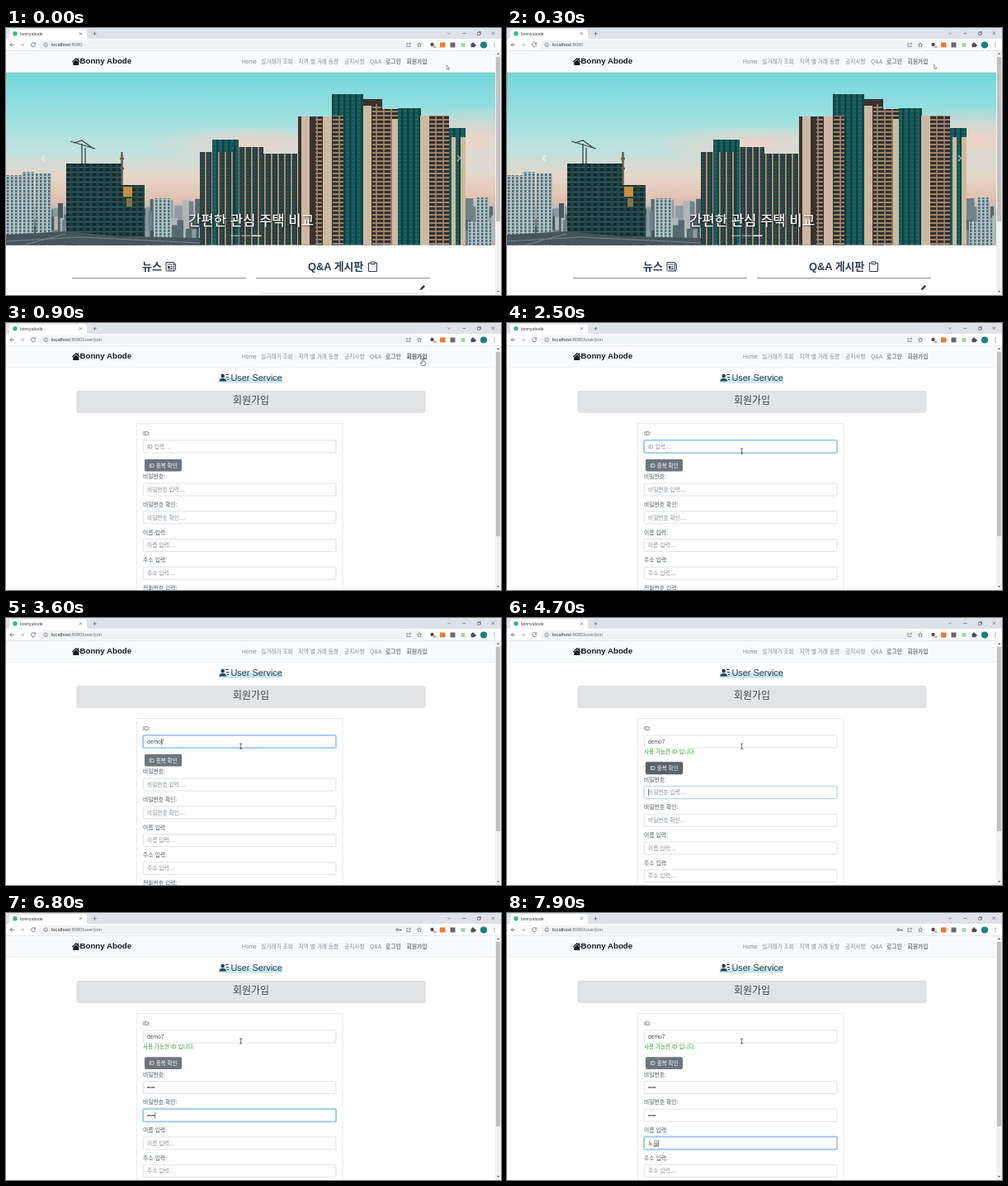
An HTML page for the animation above (8 s loop, 600x323 px).

```html
<!DOCTYPE html>
<html lang="ko">
<head>
<meta charset="utf-8">
<style>
html, body { margin: 0; width: 100%; height: 100%; overflow: hidden; background: #fff; }
svg { display: block; width: 100vw; height: 100vh; font-family: "Liberation Sans", "Noto Sans CJK KR", sans-serif; }
text { white-space: pre; }
</style>
</head>
<body>
<svg id="stage" viewBox="0 0 600 323" xmlns="http://www.w3.org/2000/svg">
  <defs>
    <linearGradient id="sky" x1="0" y1="0" x2="0" y2="1">
      <stop offset="0" stop-color="#72d6da"/><stop offset=".25" stop-color="#9be0e1"/>
      <stop offset=".45" stop-color="#bfe2df"/><stop offset=".6" stop-color="#e6d6c8"/>
      <stop offset=".72" stop-color="#e3c3b1"/><stop offset=".85" stop-color="#b3b0b0"/>
    </linearGradient>
    <radialGradient id="cloud"><stop offset="0" stop-color="#f3d3c5" stop-opacity=".95"/><stop offset="1" stop-color="#f3d3c5" stop-opacity="0"/></radialGradient>
    <pattern id="glass" width="7" height="5" patternUnits="userSpaceOnUse">
      <rect width="7" height="5" fill="#155a5a"/><path d="M0 .5H7" stroke="#2d7773" stroke-width=".6"/>
      <rect x="3" width="2.500" height="5" fill="#0d4144"/>
    </pattern>
    <pattern id="stripes" width="8" height="4" patternUnits="userSpaceOnUse">
      <rect width="8" height="4" fill="#2f3a3a"/><rect x="1" width="1.800" height="4" fill="#a89780"/>
      <rect x="4" y="1" width="3" height="2" fill="#1c5553"/>
    </pattern>
    <pattern id="balcony" width="9" height="5" patternUnits="userSpaceOnUse">
      <rect width="9" height="5" fill="#8c7560"/><rect y="2" width="7" height="3" fill="#352f2c"/>
      <path d="M0 1H9" stroke="#b39d82" stroke-width=".7"/>
    </pattern>
    <pattern id="flats" width="5" height="4" patternUnits="userSpaceOnUse">
      <rect width="5" height="4" fill="#b3c3c5"/><rect x="1" width="2.500" height="3" fill="#4f6f78"/>
    </pattern>
    <pattern id="frame" width="8" height="6" patternUnits="userSpaceOnUse">
      <rect width="8" height="6" fill="#1d4245"/><path d="M0 .5H8" stroke="#3f615f" stroke-width=".7"/>
      <rect x="1" y="2" width="4" height="3" fill="#11292d"/>
    </pattern>
    <filter id="soft" x="-10%" y="-30%" width="120%" height="180%">
      <feDropShadow dx=".8" dy=".8" stdDeviation=".9" flood-color="#000" flood-opacity=".9"/>
    </filter>
    <clipPath id="photoClip"><rect y="53.5" width="593" height="209"/></clipPath>
  </defs>
  <rect width="600" height="323" fill="#fff"/>
  <g id="home"></g>
  <g id="join"></g>
  <g id="nav"></g>
  <g id="chrome"></g>
  <g id="pointer"></g>
</svg>
<script>
const LOOP = 8000;
const $ = id => document.getElementById(id);
const rect = (x, y, w, h, fill, more = "") =>
  `<rect x="${x}" y="${y}" width="${w}" height="${h}" fill="${fill}" ${more}/>`;
const line = (d, stroke, width = 0.8, more = "") =>
  `<path d="${d}" fill="none" stroke="${stroke}" stroke-width="${width}" ${more}/>`;
const shape = (d, fill, more = "") => `<path d="${d}" fill="${fill}" ${more}/>`;
const circle = (x, y, r, fill) => `<circle cx="${x}" cy="${y}" r="${r}" fill="${fill}"/>`;
const ellipse = (x, y, rx, ry, fill) => `<ellipse cx="${x}" cy="${y}" rx="${rx}" ry="${ry}" fill="${fill}"/>`;
const text = (x, y, size, fill, str, more = "") =>
  `<text x="${x}" y="${y}" font-size="${size}" fill="${fill}" ${more}>${str}</text>`;
const clamp = v => Math.max(0, Math.min(1, v));
const ease = v => (v = clamp(v), v * v * (3 - 2 * v));
const BOLD = 'font-weight="700"';
const MIDDLE = 'text-anchor="middle"';

function skyline(from, to) {
  const tones = ["#8d9ca2", "#6f8288", "#b2b7b6", "#566a70", "#47595f"];
  let seed = 7, out = "";
  const random = () => (seed = (seed * 16807) % 2147483647) / 2147483647;
  for (let row = 0; row < 3; row++) {
    for (let x = from; x < to; x += 4 + random() * 6) {
      const y = 206 + row * 13 + random() * 14;
      out += rect(x, y, 4 + random() * 7, 263 - y, tones[Math.floor(random() * tones.length)]);
    }
  }
  return out;
}

function photo() {
  const cream = "#cdb9a0", shade = "#3a3330";
  // Each tower: left, top, right, fill; all reach the lower edge.
  const towers = [
    [0, 178, 19, "flats"], [19, 174, 34, "flats"], [36, 176, 55, "flats"],
    [179, 206, 200, "flats"], [560, 234, 588, "flats"], [570, 205, 585, "flats"],
    [73, 164, 140, "frame"], [140, 190, 168, "frame"],
    [235, 150, 251, "stripes"], [250, 135, 282, "glass"], [256, 150, 276, "stripes"],
    [282, 144, 312, "stripes"], [312, 152, 353, "stripes"],
    [354, 107, 396, shade], [358, 107, 368, cream], [384, 107, 395, cream],
    [395, 80, 433, "glass"], [396, 106, 409, "balcony"], [433, 86, 456, shade],
    [433, 94, 443, cream], [444, 92, 455, "balcony"], [455, 98, 476, "balcony"],
    [468, 110, 475, cream], [475, 97, 503, "glass"], [502, 106, 514, cream],
    [513, 106, 537, "balcony"], [537, 121, 557, "glass"], [540, 132, 545, cream], [551, 132, 557, cream],
  ];
  let out = rect(0, 53, 593, 210, "url(#sky)")
    + ellipse(570, 135, 120, 42, "url(#cloud)") + ellipse(300, 140, 130, 24, "url(#cloud)")
    + skyline(0, 240) + skyline(556, 593);
  out += towers.map(([x, y, right, fill]) =>
    rect(x, y, right - x, 263 - y, fill[0] === "#" ? fill : `url(#${fill})`)).join("");
  out += rect(375, 107, 8, 156, "url(#balcony)");
  out += rect(142, 192, 11, 12, "#c98f3c") + rect(146, 206, 7, 10, "#8a7440");
  out += line("M78 137L108 146M92 140V164M82 139L92 136L106 146M96 145V164", "#38464a", 1.3);
  out += line("M140.500 150V190M138 158H143M138 170H143", "#665950", 2.5);
  out += shape("M0 250L72 246L140 252L235 254V263H0Z", "#45555b");
  out += line("M0 258L90 253L235 260M20 263L72 249", "#77868a", 1);
  return `<g clip-path="url(#photoClip)">${out}</g>`;
}

function drawHome() {
  const ink = "#2c3e50";
  $("home").innerHTML = photo()
    + line("M47 154L43.500 157.500L47 161M547 154L550.500 157.500L547 161", "#fff", 1.3, 'opacity=".6"')
    + text(297, 238.5, 16.7, "#fff", "간편한 관심 주택 비교", MIDDLE + ' filter="url(#soft)"')
    + rect(272, 250.7, 11.5, 1.3, "#fff", 'opacity=".5"')
    + rect(285, 250.7, 11.5, 1.3, "#fff", 'opacity=".5"')
    + rect(298, 250.7, 11.5, 1.3, "#fff")
    + text(165, 293, 13, ink, "뉴스", BOLD) + text(366, 293, 12.9, ink, "Q&amp;A 게시판", BOLD)
    + line("M194 283.500H203.500V294H195.500Q194 294 194 292.500ZM203.500 285.500H205.500V292.500Q205 294 203.500 294", ink, 1)
    + line("M195.500 286H202M199.500 288.500H202M199.500 290.500H202M196 292H202", ink, 0.9) + rect(196, 288, 2.7, 2.8, ink)
    + line("M442 284.200H439.500V294.500H449.500V284.200H447M442 283H447V285.500H442Z", ink, 1)
    + rect(80, 302, 211, 1.1, "#909294") + rect(303, 302, 211, 1.1, "#909294")
    + shape("M502 317L502.600 314.700L506.300 311L508 312.700L504.300 316.400Z", "#333")
    + rect(308, 320.5, 200, 0.8, "#d5d7d9");
}

function drawChrome() {
  const gray = "#5f6368";
  $("chrome").innerHTML = rect(0, 0, 600, 13, "#dee1e6")
    + shape("M2 13Q4 13 4 11V3.500Q4 1.500 6 1.500H96Q98 1.500 98 3.500V11Q98 13 100 13Z", "#fff")
    + rect(0, 13, 600, 14, "#fff") + rect(0, 27, 600, 0.6, "#dcdee0")
    + circle(11, 6.8, 2.8, "#41b883") + text(17, 8.6, 5, "#3c4043", "bonnyabode")
    + line("M89 5.200L92 8.200M92 5.200L89 8.200M105.300 6.800H109.700M107.500 4.600V9", gray, 0.7)
    + line("M535.200 5.500L537 7.300L538.800 5.500M553.300 6.500H557.300M571.500 5.500H574.500V8.500H571.500ZM572.500 5.500V4.500H575.500V7.500H574.500M588.500 4.500L592 8M592 4.500L588.500 8", "#555", 0.6)
    + line("M10 20.300H5M7.300 18L5 20.300L7.300 22.600", gray)
    + line("M17 20.300H22M19.700 18L22 20.300L19.700 22.600", "#b5b8bb")
    + line("M35.300 18.700A2.600 2.600 0 1 0 35.700 21M35.700 17.500V19.300H33.800", gray)
    + rect(40, 15, 467, 11, "#f1f3f4", 'rx="5.500"')
    + line("M50.500 20.300A2.300 2.300 0 1 0 45.900 20.300A2.300 2.300 0 1 0 50.500 20.300M48.200 19.900V21.600M48.200 18.800V19.200", gray, 0.6)
    + `<text x="55" y="22.400" font-size="5.800" fill="#333">localhost<tspan fill="#6b6f74">:8080</tspan><tspan id="path" fill="#6b6f74">/user/join</tspan></text>`
    + `<g id="key">${line("M475.500 20.300A1.300 1.300 0 1 0 472.900 20.300A1.300 1.300 0 1 0 475.500 20.300H479V21.800M477.500 20.300V21.400", gray, 0.9)}</g>`
    + line("M487.500 18.500H485.800V22.600H490V21M487.500 20.700Q488 18.800 490.500 18.800M489.300 17.500L490.700 18.800L489.300 20.100", gray, 0.6)
    + line("M501 17.600L501.800 19.500L503.700 19.600L502.200 20.900L502.700 22.800L501 21.700L499.300 22.800L499.800 20.900L498.300 19.600L500.200 19.500Z", gray, 0.6)
    + circle(516.5, 20, 2.2, "#4c545c") + rect(518, 21.5, 3.5, 2.5, "#dba5a0")
    + rect(526, 17.5, 6.5, 6, "#ef7a2f") + rect(538.5, 17.5, 6, 6, "#686b6c")
    + rect(551.5, 18, 5, 5, "#a5d6ae")
    + shape("M563.500 18.700H565Q565 17.300 566 17.300T567 18.700H568.500V20Q570 20 570 21T568.500 22V23.300H563.500Z", "#4b4f53")
    + circle(579, 20.5, 4.1, "#17837c")
    + circle(592, 18.4, 0.6, gray) + circle(592, 20.5, 0.6, gray) + circle(592, 22.6, 0.6, gray)
    + rect(593, 27.5, 7, 296, "#f1f1f1") + rect(594, 35, 5.2, 223, "#c1c1c1", 'id="thumb"')
    + shape("M595 32L596.600 30L598.200 32ZM595 318L596.600 320L598.200 318Z", "#666");
}

function drawNav() {
  const links = [[286, "Home"], [309, "실거래가 조회"], [354.5, "지역 별 거래 동향"], [410, "공지사항"], [441, "Q&amp;A"]];
  $("nav").innerHTML = rect(0, 27, 593, 26.2, "#f8f9fa") + rect(0, 53, 593, 0.6, "#e6e8ea")
    + shape("M79.800 40.800L84.800 36L86.500 37.600V36.500H88V39L89.800 40.800L89 41.500L84.800 37.700L80.600 41.500ZM81.300 41.500L84.800 38.500L88.300 41.500V45H81.300Z", "#16191c")
    + text(89.5, 43.3, 9.7, "#16191c", "Bonny Abode", BOLD)
    + links.map(([x, s]) => text(x, 42.7, 6.7, "#8b8c8e", s)).join("")
    + text(460, 42.7, 6.8, "#787a7c", "로그인", BOLD)
    + text(485.5, 42.7, 6.8, "#787a7c", "회원가입", BOLD + ' id="signup"');
}

// Focus spans and keystroke times in ms.
const focusSpans = { id: [2100, 3850], check: [3850, 4650], pw: [4650, 5900], pw2: [5900, 6950], name: [6950, 9000] };
const keys = {
  id: [2900, 3050, 3200, 3350, 3550], pw: [5500, 5600, 5700, 5800],
  pw2: [6200, 6350, 6500, 6650], name: [7300, 7400, 7500, 7700, 7800],
};
const syllables = ["", "ㄴ", "노", "농", "노으", "노을"];
const typed = (name, t) => keys[name].filter(k => t >= k).length;
const glow = (name, t) => {
  const [start, end] = focusSpans[name];
  return clamp((t - start) / 150) * (1 - clamp((t - end) / 150));
};
const caret = (name, t) => {
  const [start, end] = focusSpans[name];
  const last = Math.max(start, ...(keys[name] || []).filter(k => k <= t));
  return t >= start && t < end && (t - last) % 1000 < 350;
};

function field(y, label, hint, t, name, value = "") {
  const a = name ? glow(name, t) : 0;
  let out = text(166, y + 14.5, 6.8, "#4c565f", label)
    + rect(165.5, y + 19.8, 235, 16.4, "none", `rx="2" stroke="#80bdff" stroke-width="1.300" stroke-opacity="${a * 0.5}"`)
    + rect(166.3, y + 20.5, 233.6, 15, "#fff", 'rx="1.600" stroke="#d3d8dd" stroke-width=".7"')
    + rect(166.3, y + 20.5, 233.6, 15, "none", `rx="1.600" stroke="#69afe9" stroke-width=".8" stroke-opacity="${a}"`)
    + text(171, y + 30.3, 6.7, value ? "#495057" : "#858c93", value || hint);
  const width = { id: 3.35, pw: 2.35, pw2: 2.35, name: 6.16 }[name] || 0;
  const end = 171 + value.length * width;
  if (name === "name" && value) out += rect(end - 6, y + 31.5, 6, 0.6, "#444");
  if (name && caret(name, t)) out += rect(end + 0.2, y + 24, 0.6, 8, "#222");
  return out;
}

function drawJoin(t) {
  const checked = t >= 4200 ? 9.4 : 0;
  const pw = typed("pw", t), pw2 = typed("pw2", t);
  const mismatch = pw !== pw2 ? 9.2 : 0;
  const press = glow("check", t);
  const y = 121.5, step = 33.7, base = 173.6 + checked;
  let out = line("M158.500 330V121.500H408V330", "#e5e7e9", 0.8)
    + rect(258, 66, 77, 6.5, "#c5e6ef")
    + circle(262.7, 64, 2.3, "#2c3e50") + shape("M258.500 70.500Q258.500 67 262.700 67T267 70.500Z", "#2c3e50")
    + line("M266 62.500H270M267 65.500H270M268 68.500H270", "#2c3e50", 1)
    + text(272.5, 70, 10.9, "#2c3e50", "User Service")
    + rect(86, 82.3, 422, 26, "#e2e3e5", 'rx="2" stroke="#d3d5d8" stroke-width=".7"')
    + text(297, 97.5, 12, "#42484d", "회원가입", MIDDLE)
    + field(y, "ID:", "ID 입력....", t, "id", "demo7".slice(0, typed("id", t)));
  if (checked) out += text(166, 163.6, 6.6, "#30a12d", "사용 가능한 ID 입니다.");
  out += rect(167.2, 164 + checked, 46.6, 16.3, "#6c757d", `rx="2.600" opacity="${press * 0.5}"`)
    + rect(168, 164.8 + checked, 45, 14.7, press > 0.5 ? "#5a6268" : "#6c757d", 'rx="1.800"')
    + text(190.5, 174.6 + checked, 6.6, "#fff", "ID 중복 확인", MIDDLE + ' font-weight="500"')
    + field(base, "비밀번호:", "비밀번호 입력....", t, "pw", "•".repeat(pw))
    + field(base + step, "비밀번호 확인:", "비밀번호 확인....", t, "pw2", "•".repeat(pw2));
  if (mismatch) out += text(166, base + step + 42.1, 6.6, "#f0392f", "입력된 비밀번호가 다릅니다.");
  const rest = base + 2 * step + mismatch;
  out += field(rest, "이름 입력:", "이름 입력....", t, "name", syllables[typed("name", t)])
    + field(rest + step, "주소 입력:", "주소 입력....", t)
    + field(rest + 2 * step, "전화번호 입력:", "전화번호 입력....", t);
  $("join").innerHTML = out;
}

const pointers = {
  arrow: `<path d="M0 0V5L1.200 3.900L2 5.700L2.800 5.300L2 3.600H3.600Z" fill="#fff" stroke="#555" stroke-width=".5"/>`,
  hand: `<path d="M-.8 -3.500Q0 -4.500 .7 -3.500V-.8L3 -.2Q3.600 .2 3.400 1.500L2.700 4.500H-.8L-2.800 1.200Q-2.300 .3 -.8 1.500Z" fill="#fff" stroke="#333" stroke-width=".6"/>`,
  beam: `<path d="M-1.500 -3H1.500M0 -3V3M-1.500 3H1.500" fill="none" stroke="#333" stroke-width=".7"/>`,
};

function drawPointer(t) {
  const a = ease((t - 50) / 450), b = ease((t - 600) / 250), c = ease((t - 1050) / 900);
  let x = 534 - 28 * a - b, y = 45 - a + 3 * b;
  x += (284.7 - x) * c;
  y += (155 - y) * c;
  const kind = y > 142 ? "beam" : x < 511 && y < 52 && x > 484 ? "hand" : "arrow";
  $("pointer").innerHTML = pointers[kind];
  $("pointer").setAttribute("transform", `translate(${x} ${y})`);
  $("signup").setAttribute("fill", kind === "hand" ? "#4f5153" : "#787a7c");
}

function show(id, on) { $(id).setAttribute("display", on ? "inline" : "none"); }

function render(t) {
  const joined = t >= 800;
  show("home", !joined);
  show("join", joined);
  show("path", joined);
  show("key", t >= keys.pw[0]);
  $("thumb").setAttribute("height", joined ? 223 : 199);
  if (joined) drawJoin(t);
  drawPointer(t);
}

drawHome();
drawChrome();
drawNav();
const begin = performance.now();
function tick() {
  render((performance.now() - begin) % LOOP);
  requestAnimationFrame(tick);
}
tick();
</script>
</body>
</html>
```
